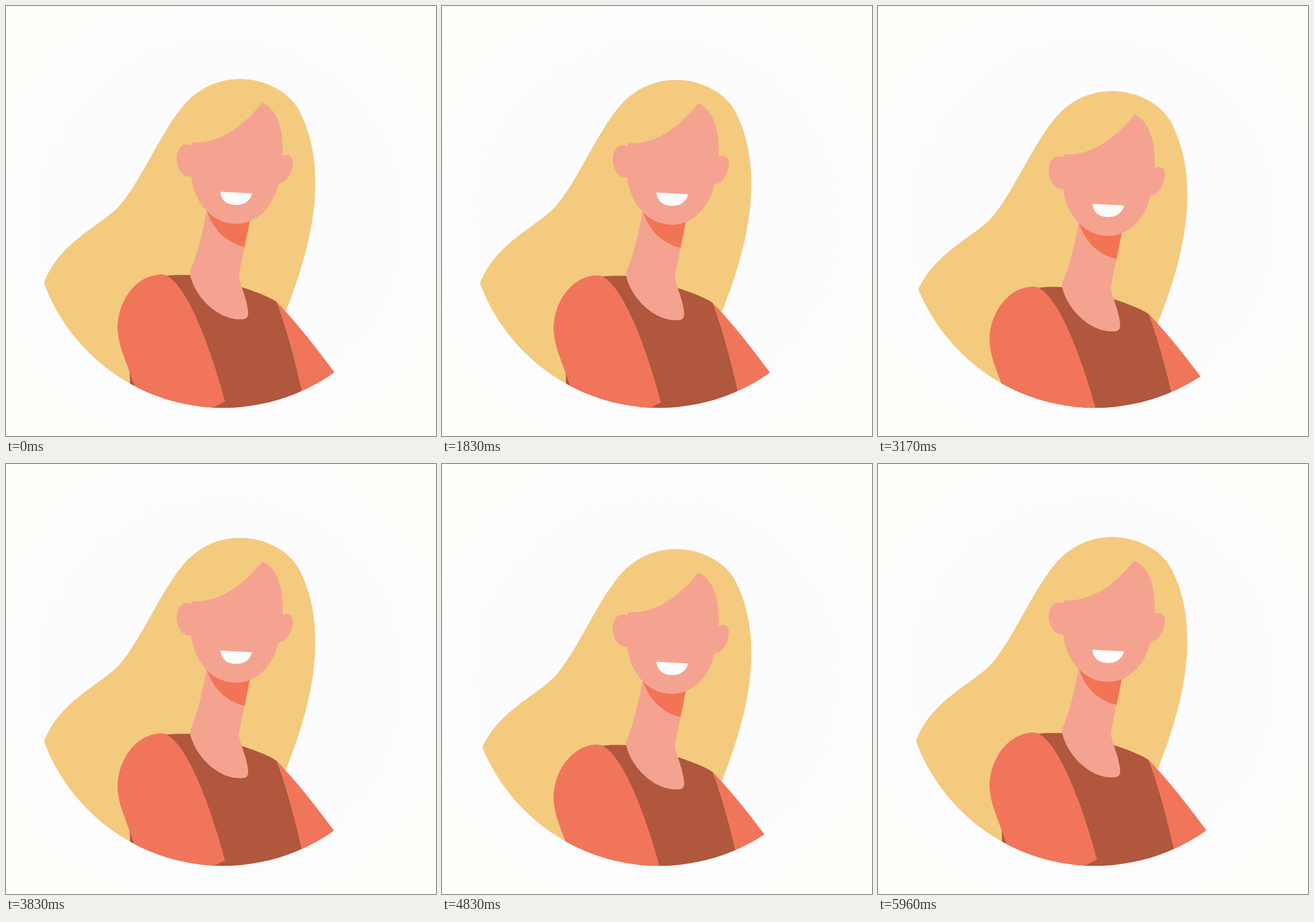
An HTML page for the animation above (6 s loop, 748 px wide and 748 px high).

```html
<!DOCTYPE html>
<html lang="en">
<head>
<meta charset="utf-8">
<title>Portrait</title>
<style>
  html, body { margin: 0; width: 100%; height: 100%; overflow: hidden; }
  body { background: radial-gradient(circle farthest-corner, #fcfcff 55%, #fdfef7 95%); }
  svg { display: block; width: 100vw; height: 100vh; }
  .hair { fill: #f4ca7f; }
  .dress { fill: #b0573d; }
  .sleeve { fill: #f1755a; }
  .skin { fill: #f5a391; }
  .shadow { fill: #f37455; }
  .teeth { fill: #fdfdfe; }
</style>
</head>
<body>
<svg viewBox="0 0 748 748">
  <clipPath id="disc">
    <!-- open at the top, round below -->
    <path d="M0 0H748V366H711A333 333 0 0 1 45 366H0Z"/>
  </clipPath>
  <g clip-path="url(#disc)">
    <g id="woman">
      <path class="hair" d="M408 127C450 127 497 150 513 188C531 225 538 265 538 308
        C538 380 517 455 487 530L470 570L400 720H40L50 530L66 482
        C92 412 160 385 195 350C232 310 268 222 308 174C335 142 370 127 408 127Z"/>
      <path class="dress" d="M279 469Q300 467 321 468L410 489C435 497 460 507 471 515
        C488 560 500 605 515 669L524 720H218L215 630Z"/>
      <path class="sleeve" d="M471 515C505 550 540 595 571 637L595 671L526 720L515 669
        C500 605 488 560 471 515Z"/>
      <path class="sleeve" d="M270 467Q275 467 279 469C320 490 360 610 381 688L361 698L300 728L246 724
        L216 640C208 615 195 590 194 560C194 515 225 468 270 467Z"/>
      <path class="skin" d="M349 355C343 390 335 425 323 455C318 462 320 470 324 480
        C335 510 370 547 410 545C421 545 422 538 421 530C418 505 405 480 405 468L424 374L400 350Z"/>
      <path class="shadow" d="M349 355L424 370V374L415 419C385 413 360 390 349 355Z"/>
      <path class="skin" d="M446 168C470 178 484 212 481 261C490 256 499 260 499 272
        C499 289 488 308 474 309C466 345 440 378 401 379C360 379 328 345 322 297
        C305 298 297 280 297 266C297 248 308 235 323 243L324 237C370 240 410 212 446 168Z"/>
      <path class="teeth" d="M373 323L428 326C425 340 412 347 400 346C384 346 374 337 373 323Z"/>
    </g>
  </g>
</svg>
<script>
  const woman = document.getElementById("woman");
  const FPS = 24, LOOP = 6000, BOB = 2000, DEPTH = 11.2;

  function draw(now) {
    const time = Math.floor((now % LOOP + 5) * FPS / 1000) * 1000 / FPS;
    const y = DEPTH * (1 - Math.cos(2 * Math.PI * time / BOB));
    woman.setAttribute("transform", `translate(0 ${y.toFixed(2)})`);
  }

  function tick() {
    draw(performance.now());
    requestAnimationFrame(tick);
  }
  tick();
</script>
</body>
</html>
```
